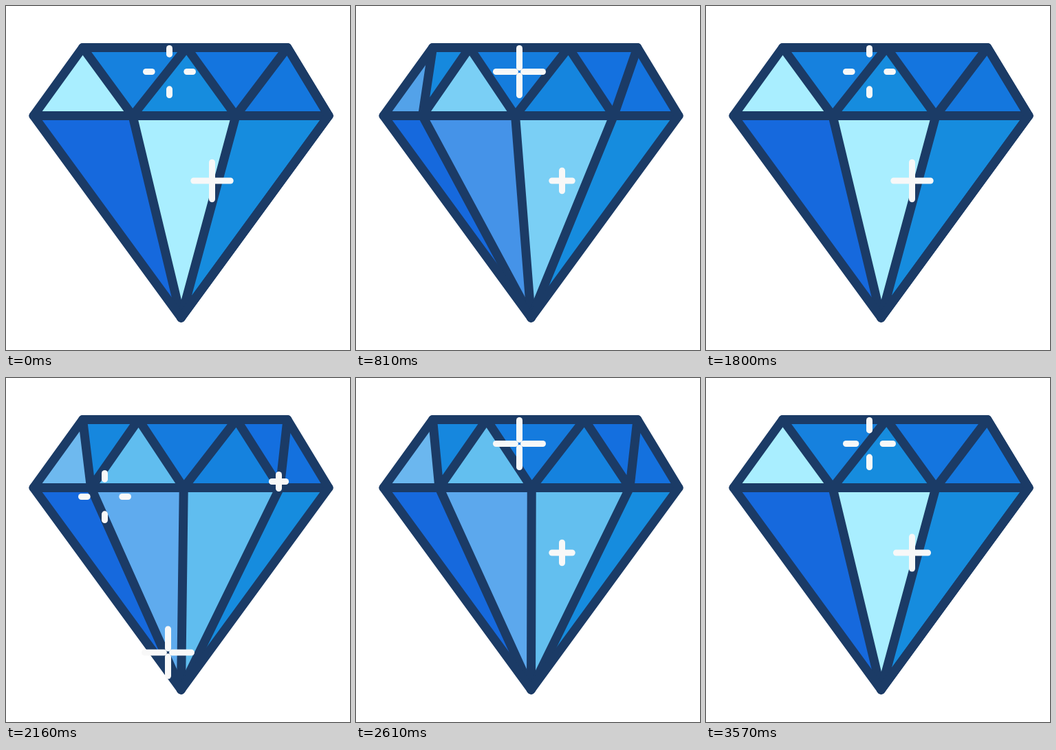
An HTML page with a canvas for the animation above (3600 ms loop, 500 by 500 pixels).

```html
<!DOCTYPE html>
<html lang="en">
<head>
<meta charset="utf-8">
<title>Diamond</title>
<style>
html, body { margin: 0; width: 100%; height: 100%; overflow: hidden; background: #fff; }
canvas { display: block; width: 500px; height: 500px; }
</style>
</head>
<body>
<canvas id="stage" width="500" height="500"></canvas>
<script>
const ctx = document.getElementById('stage').getContext('2d');
const LOOP = 3600, STEP = 30;
const INK = '#1b3b66', SHINE = '#f8f8f8';
const TOP = 60.5, GIRDLE = 159.5;
const TIP = [254.5, 453], LEFT = [40, GIRDLE], RIGHT = [469, GIRDLE];
const TL = [111.5, TOP], TR = [409, TOP];

// time, then turns made by the left, middle and right edges;
// each whole turn moves every facet one place to the left
const TURN = [
  [0, 0, 0, 0],
  [510, .567, .575, .61],
  [810, .607, .683, .70],
  [1110, 1, 1, 1],
  [1290, 1.326, 1.32, 1.36],
  [1800, 2, 2, 2],
  [2160, 2.42, 2.505, 2.526],
  [2610, 2.438, 2.525, 2.527],
  [3560, 3, 3, 3],
  [3600, 3, 3, 3]
];

// x, y, start in steps of a 30-step cycle
const SPARKS = [
  [143.5, 172.5, 0], [235.5, 399, 3], [396.5, 150.5, 10],
  [237.5, 95.5, 18], [299.5, 254, 24]
];

const mix = (a, b, k) => a + (b - a) * k;
const clamp = v => Math.min(1, Math.max(0, v));
const easeOut = s => 1 - Math.pow(1 - clamp(s), 1.4);

function blend(from, to, k) {
  const part = s => [1, 3, 5].map(i => parseInt(s.slice(i, i + 2), 16));
  const a = part(from), b = part(to);
  return `rgb(${a.map((v, i) => Math.round(mix(v, b[i], k)))})`;
}

const slope = (i, c) => (TURN[i + 1][c] - TURN[i][c]) / (TURN[i + 1][0] - TURN[i][0]);

function tangent(i, c) {
  if (i === 0 || i === TURN.length - 1) return 0;
  const a = slope(i - 1, c), b = slope(i, c);
  return a * b > 0 ? 2 * a * b / (a + b) : 0;
}

// monotone cubic through the keys, wrapped to one turn
function turn(t, c) {
  let i = 0;
  while (i < TURN.length - 2 && t >= TURN[i + 1][0]) i++;
  const h = TURN[i + 1][0] - TURN[i][0], s = (t - TURN[i][0]) / h, r = 1 - s;
  const v = TURN[i][c] * (1 + 2 * s) * r * r + TURN[i + 1][c] * s * s * (3 - 2 * s)
    + h * s * r * (tangent(i, c) * r - tangent(i + 1, c) * s);
  return (v + 1e-9) % 1;
}

function trace(points) {
  ctx.beginPath();
  points.forEach(p => ctx.lineTo(p[0], p[1]));
}

function face(color, ...points) {
  trace(points);
  ctx.fillStyle = color;
  ctx.fill();
}

function line(...points) {
  trace(points);
  ctx.stroke();
}

function gem(t) {
  const l = turn(t, 1), m = turn(t, 2), r = turn(t, 3);
  const L = [mix(184, 40, l), GIRDLE];
  const M = [mix(334, 184, m), GIRDLE];
  const R = [mix(469, 334, r), GIRDLE];
  const A = [mix(262.5, 111.5, (l + m) / 2), TOP];
  const B = [mix(409, 262.5, m), TOP];

  face('#1669dd', LEFT, L, TIP);
  face(blend('#a9eeff', '#1669dd', m), L, M, TIP);
  face(blend('#168cde', '#a9eeff', m), M, R, TIP);
  face('#168cde', R, RIGHT, TIP);

  face(blend('#a9eeff', '#1c70da', l), TL, LEFT, L);
  face(blend('#1681de', '#168cde', m), TL, L, A);
  face(blend('#168cde', '#a9eeff', m), L, A, M);
  face(blend('#1475df', '#1681de', m), A, M, B);
  face(blend('#1477de', '#168cde', m), M, B, R);
  face(blend('#1469df', '#1475df', m), B, R, TR);
  face(blend('#146ade', '#1477de', m), TR, R, RIGHT);

  ctx.strokeStyle = INK;
  ctx.lineWidth = 13;
  line(TL, L, A, M, B, R, TR);
  [L, M, R].forEach(p => line(p, TIP));
  line(LEFT, RIGHT);
  line(TL, TR, RIGHT, TIP, LEFT, TL, TR);
}

function spark(x, y, age) {
  const outer = 34 * easeOut(age / 9), inner = 34 * easeOut((age - 8.2) / 6.1);
  if (outer <= 0 || inner >= 34) return;
  ctx.strokeStyle = SHINE;
  ctx.lineWidth = 9;
  for (const [dx, dy] of [[1, 0], [0, 1], [-1, 0], [0, -1]]) {
    line([x + dx * inner, y + dy * inner], [x + dx * outer, y + dy * outer]);
  }
}

function draw(t) {
  ctx.fillStyle = '#fff';
  ctx.fillRect(0, 0, 500, 500);
  ctx.lineCap = ctx.lineJoin = 'round';
  gem(t);
  for (const [x, y, start] of SPARKS) spark(x, y, (t / STEP - start + 60) % 30);
}

const begin = performance.now();
function tick() {
  const t = (performance.now() - begin) % LOOP;
  draw(Math.floor(t / STEP) * STEP);
  requestAnimationFrame(tick);
}
tick();
</script>
</body>
</html>
```
